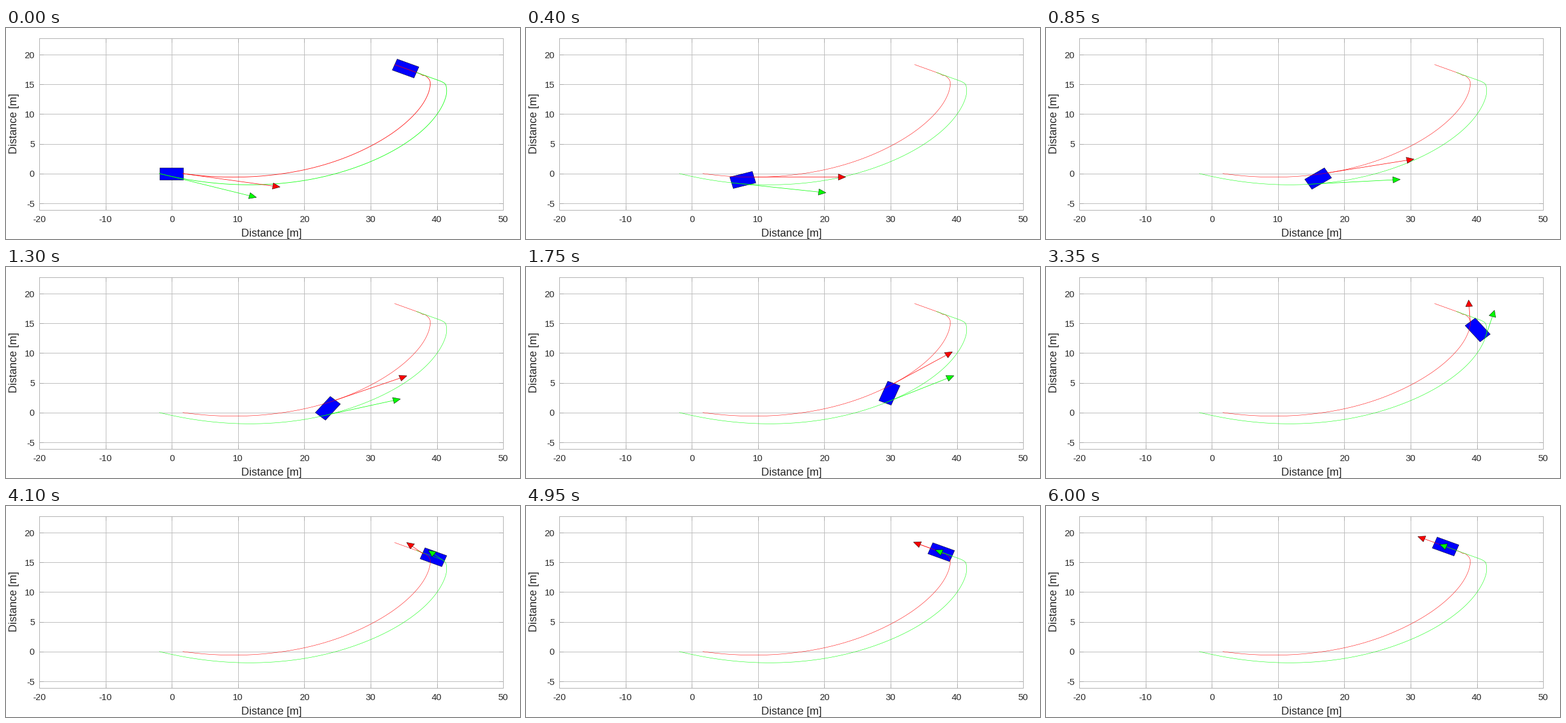
Recreate the animation shown at these times as a matplotlib script. Size 850 by 349 pixels, loop 6050 ms.

```python
import numpy as np
import matplotlib.pyplot as plt
from matplotlib.animation import FuncAnimation
from matplotlib.patches import Polygon

W, H, DPI = 850, 349, 100
PX = 72 / DPI                     # one pixel in points
FRAMES, STEP_MS = 121, 50
LAST = FRAMES - 1

# Plot box and data scale in pixels
LEFT, RIGHT, TOP, BOTTOM = 55.1, 822.1, 16.9, 300.9
X0, Y0, SX, SY = 274.24, 240.8, 10.957, 9.84

LENGTH, WIDTH = 3.54, 2.0         # vehicle size in metres
TURN, TURN_END = np.radians(1.935), np.radians(158.1)
SPEED_SCALE = 1 / 0.0735          # metres per step to arrow length
HEAD, HEAD_HALF = 1.1, 0.52
INK = "#262626"

# Rear axle: step, x, y, dx, dy
KEYS = np.array([
    (0, -1.87, 0.00, 0.998, -0.273),
    (17, 14.56, -1.80, 0.939, 0.055),
    (35, 29.16, 1.63, 0.690, 0.303),
    (51, 37.69, 7.14, 0.381, 0.369),
    (67, 41.25, 12.53, 0.080, 0.266),
    (75, 41.47, 14.15, -0.012, 0.185),
    (82, 41.12, 15.20, -0.112, 0.085),
    (91, 40.18, 15.69, -0.1123, 0.0451),
    (120, 36.92, 17.00, -0.1123, 0.0451),
])


def heading(t):
    return np.minimum(TURN * t, TURN_END)


def unit(a):
    return np.stack([np.cos(a), np.sin(a)], -1)


def rear(t):
    """Position and velocity of the rear axle (cubic Hermite)."""
    t = np.asarray(t, float)
    i = np.clip(np.searchsorted(KEYS[:, 0], t, "right") - 1, 0, len(KEYS) - 2)
    a, b = KEYS[i], KEYS[i + 1]
    h = (b[..., 0] - a[..., 0])[..., None]
    u = (t - a[..., 0])[..., None] / h
    p0, p1 = a[..., 1:3], b[..., 1:3]
    m0, m1 = a[..., 3:] * h, b[..., 3:] * h
    pos = ((2*u**3 - 3*u**2 + 1) * p0 + (u**3 - 2*u**2 + u) * m0
           + (3*u**2 - 2*u**3) * p1 + (u**3 - u**2) * m1)
    vel = ((6*u**2 - 6*u) * (p0 - p1) + (3*u**2 - 4*u + 1) * m0
           + (3*u**2 - 2*u) * m1) / h
    return pos, vel


def front(t):
    """Position and velocity of the front of the rigid body."""
    pos, vel = rear(t)
    a = heading(t)
    spin = np.where(TURN * np.asarray(t) < TURN_END, TURN * LENGTH, 0.0)
    return (pos + LENGTH * unit(a),
            vel + spin[..., None] * unit(a + np.pi / 2))


def body(t):
    r, f = rear(t)[0], front(t)[0]
    side = unit(heading(t) + np.pi / 2) * WIDTH / 2
    return np.array([r - side, f - side, f + side, r + side])


class Arrow:
    def __init__(self, ax, point, color):
        self.point = point
        self.stem, = ax.plot([], [], color=color, lw=0.75 * PX, zorder=5)
        self.head = Polygon(np.zeros((3, 2)), fc=color, ec="black",
                            lw=0.5 * PX, zorder=6)
        ax.add_patch(self.head)

    def set(self, t):
        pos, vel = self.point(t)
        d = vel / np.hypot(*vel)
        side = np.array([-d[1], d[0]]) * HEAD_HALF
        end = pos + vel * SPEED_SCALE
        self.stem.set_data(*np.array([pos, end]).T)
        self.head.set_xy([end + side, end + HEAD * d, end - side])


fig = plt.figure(figsize=(W / DPI, H / DPI), dpi=DPI, facecolor="white")
ax = fig.add_axes([LEFT / W, 1 - BOTTOM / H,
                   (RIGHT - LEFT) / W, (BOTTOM - TOP) / H])
ax.set_xlim(-20, 50)
ax.set_ylim((Y0 - BOTTOM) / SY, (Y0 - TOP) / SY)
ax.set_xticks(range(-20, 51, 10))
ax.set_yticks(range(-5, 21, 5))
ax.set_axisbelow(True)
ax.grid(color="#bdbdbd", lw=PX)
ax.tick_params(direction="in", length=7 * PX, width=PX, color="#a6a6a6",
               top=True, right=True, labelbottom=False, labelleft=False)
for spine in ax.spines.values():
    spine.set_linewidth(PX)
    spine.set_color("#b0b0b0")


def label(x, y, s, size, **kw):
    fig.text(x / W, 1 - y / H, s, fontsize=size * PX, color=INK,
             family="Liberation Sans", **kw)


for v in range(-20, 51, 10):
    label(X0 + v * SX, 321, str(v), 15, ha="center", va="baseline")
for v in range(-5, 21, 5):
    label(47.3, Y0 + 5.5 - v * SY, str(v), 15, ha="right", va="baseline")
label(439.2, 345, "Distance [m]", 18, ha="center", va="baseline")
label(13.8, 157.7, "Distance [m]", 18, ha="center", va="center", rotation=90)

RED, GREEN = "#ff0000", "#00ff00"
steps = np.linspace(0, LAST, 961)
paths = [ax.plot(*point(steps)[0].T, color=c, zorder=4)[0]
         for point, c in ((front, RED), (rear, GREEN))]
cars = [ax.add_patch(Polygon(body(t), fc="#0000ff", ec="black",
                             lw=0.5 * PX, zorder=3)) for t in (0, LAST)]
arrows = [Arrow(ax, front, RED), Arrow(ax, rear, GREEN)]


def draw(n):
    first = n == 0
    cars[0].set_xy(body(n))
    cars[1].set_visible(first)    # goal pose shows only at the start
    for p in paths:
        p.set_linewidth((0.8 if first else 0.55) * PX)
    for a in arrows:
        a.set(n)
    return [*cars, *paths]


anim = FuncAnimation(fig, draw, frames=FRAMES, interval=STEP_MS,
                     repeat=True, repeat_delay=0, blit=False)
plt.show()
```
